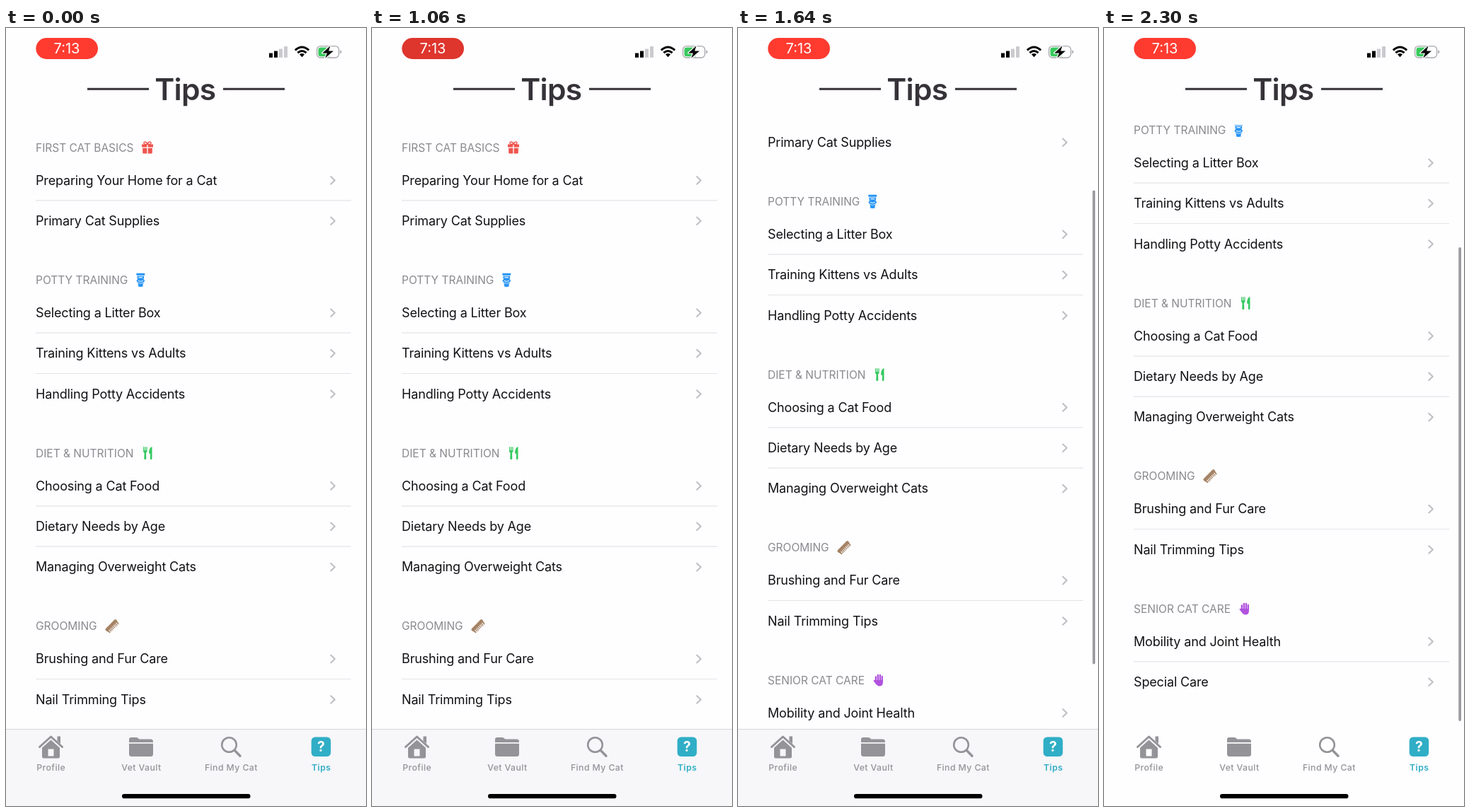
An HTML page that plays this animation: 509 px wide and 1100 px high, repeating every 2.33 s.

```html
<!DOCTYPE html>
<html lang="en">
<head>
<meta charset="utf-8">
<title>Tips</title>
<style>
  html, body { margin: 0; width: 100%; height: 100%; overflow: hidden; background: #fefdff; }
  svg { display: block; width: 100vw; height: 100vh; }
  text { font-family: Inter, "Liberation Sans", sans-serif; }
  .row { font-size: 18px; letter-spacing: -.15px; fill: #111113; }
  .head { font-size: 15.5px; fill: #8a898e; }
  .rule { stroke: #e5e4e7; stroke-width: 1.2; }
  .chevron { fill: none; stroke: #bfbec3; stroke-width: 2; stroke-linecap: round; stroke-linejoin: round; }
  .title { font-size: 42.5px; font-weight: 600; letter-spacing: -.8px; fill: #353238; }
  .clock { font-size: 20px; fill: #fff; }
  .tab { font-size: 12.3px; font-weight: 500; letter-spacing: .4px; fill: #949398; }
  .on { font-weight: 600; fill: #30aec6; }
  .mid { text-anchor: middle; }
</style>
</head>
<body>
<svg viewBox="0 0 509 1100" preserveAspectRatio="none">
  <defs>
    <clipPath id="view"><rect y="137" width="509" height="849"/></clipPath>

    <g id="gift" fill="#f0544d">
      <path d="M-8-4.5H-.7V-.5H-8ZM.7-4.5H8V-.5H.7ZM-6.8 .8H-.7V8.5H-5.5Q-6.8 8.5-6.8 7.2ZM.7 .8H6.8V7.2Q6.8 8.5 5.5 8.5H.7Z"/>
      <path d="M0-4.5C-1-9-5.5-9-5-6Q-4.6-4.5-2.5-4.5ZM0-4.5C1-9 5.5-9 5-6Q4.6-4.5 2.5-4.5Z" fill="none" stroke="#f0544d" stroke-width="1.4"/>
    </g>

    <g id="toilet" fill="#2494f5">
      <rect x="-6" y="-9.5" width="12" height="3" rx="1"/>
      <path d="M-5-5.6H5L4.5-1.5H-4.5Z"/>
      <ellipse cy="1" rx="5.6" ry="3.4"/>
      <path d="M-4.6 4.2Q0 6.4 4.6 4.2L3 6.8 3.6 9Q0 10.6-3.6 9L-3 6.8Z"/>
      <path d="M-3.6 .8Q0 3 3.6 .8M-2.8-3.7H2.8" fill="none" stroke="#fefdff" stroke-width="1.1"/>
    </g>

    <g id="cutlery" fill="#34c960">
      <path d="M-6.5-8.8H-5.3V-3.8H-4.3V-8.8H-3.1V-3.8H-2.1V-8.8H-.9V-3Q-.9-1-2.5-.4L-2.2 7.8Q-2.4 9.2-3.7 9.2T-5.2 7.8L-4.9-.4Q-6.5-1-6.5-3Z"/>
      <path d="M6-9V7.8Q6 9.2 4.7 9.2T3.3 7.8L3.6 1.2 1.6 .3Q1.6-7.6 6-9Z"/>
    </g>

    <g id="comb" transform="rotate(-45)" fill="#a58365">
      <rect x="-10.5" y="-4" width="21" height="4.6" rx="1.6"/>
      <path d="M-10.2-1H-7.6V4.5H-9.2ZM10.2-1H7.6V4.5H9.2Z"/>
      <path d="M-5.9 0V4.5M-3.6 0V4.5M-1.2 0V4.5M1.2 0V4.5M3.6 0V4.5M5.9 0V4.5" stroke="#a58365" stroke-width="1.3"/>
    </g>

    <g id="hand" fill="none" stroke="#b052de" stroke-linecap="round">
      <path d="M-4.4-4.5V2M-1.4-7V1M1.6-7V1M4.5-5V2" stroke-width="2.3"/>
      <path d="M-6.6 .8L-4 4" stroke-width="2.2"/>
      <path d="M-5.4 0H5.6V3.5Q5.4 8.5 .8 8.5-3 8.5-5.4 3.5Z" fill="#b052de" stroke="none"/>
    </g>
  </defs>

  <rect width="509" height="1100" fill="#fefdff"/>
  <g clip-path="url(#view)"><g id="list"></g></g>
  <rect id="thumb" x="501.3" y="141" width="3.7" height="670" rx="1.85" fill="#9b9a9e"/>

  <!-- Status bar -->
  <rect id="pill" x="42.3" y="14" width="87.7" height="30" rx="15"/>
  <text class="clock mid" x="86" y="36.2">7:13</text>
  <g>
    <path d="M372 35.5h5V41.7h-5ZM379 32.5h5V41.7h-5Z" fill="#000"/>
    <path d="M386 29.5h5V41.7h-5ZM393 26h5V41.7h-5Z" fill="#cbcace"/>
  </g>
  <g fill="none" stroke="#000" stroke-width="3">
    <path d="M408.8 31.4Q418.5 22.6 428.2 31.4"/>
    <path d="M412.4 35.2Q418.5 29.8 424.6 35.2"/>
    <path d="M415 37.3Q418.5 34.6 422 37.3L418.5 41.2Z" fill="#000" stroke="none"/>
  </g>
  <rect x="439.6" y="25.6" width="31" height="16.4" rx="5" fill="none" stroke="#a9a8ac" stroke-width="1.3"/>
  <path d="M472.3 31.2Q474.5 32 474.5 33.8T472.3 36.4Z" fill="#a9a8ac"/>
  <path d="M445 27.5H457.5V40.2H445Q441.5 40.2 441.5 36.7V31Q441.5 27.5 445 27.5Z" fill="#38c95d"/>
  <path d="M458.5 25.3L447.3 35.4H454L451.3 42.6 463 32.4H456.2Z" fill="#000" stroke="#fefdff" stroke-width="2.4" paint-order="stroke" stroke-linejoin="round"/>

  <!-- Title -->
  <path d="M115 86.2H202M307 86.2H394" stroke="#353238" stroke-width="3"/>
  <text class="title mid" x="253.3" y="102">Tips</text>

  <!-- Tab bar -->
  <g id="bar">
    <rect y="991" width="509" height="109" fill="#f7f6f9"/>
    <path d="M0 991.5H509" stroke="#d6d5d9" stroke-width="1.2"/>
  </g>
  <g fill="#949398">
    <path d="M47.5 1016.5L63.5 1002 79.5 1016.5" fill="none" stroke="#949398" stroke-width="3" stroke-linecap="round" stroke-linejoin="round"/>
    <path d="M72.5 1001.5H77V1012L72.5 1008Z"/>
    <path d="M51 1017.8L63.5 1006.5 76 1017.8V1030Q76 1032.5 73.5 1032.5H53.5Q51 1032.5 51 1030ZM59.5 1019.5V1029.5H67.5V1019.5Z" fill-rule="evenodd"/>
    <path d="M174 1010V1006Q174 1003 177 1003H183.5Q185.5 1003 187 1004.3L188.4 1005.5H204.5Q208 1005.5 208 1009V1010Z"/>
    <path d="M174 1011.8H208V1026.5Q208 1030 204.5 1030H177.5Q174 1030 174 1026.5Z"/>
    <g fill="none" stroke="#949398" stroke-linecap="round">
      <circle cx="315.5" cy="1013.5" r="10.3" stroke-width="2.6"/>
      <path d="M323.2 1021.3L331 1029.2" stroke-width="3.4"/>
    </g>
  </g>
  <rect x="431.7" y="1002.5" width="27.5" height="27.5" rx="5.5" fill="#30aec6"/>
  <text class="mid" x="445.5" y="1023.2" font-size="19.5" font-weight="700" fill="#fff">?</text>
  <text class="tab mid" x="63.7" y="1050">Profile</text>
  <text class="tab mid" x="191.4" y="1050">Vet Vault</text>
  <text class="tab mid" x="318.4" y="1050">Find My Cat</text>
  <text class="tab on mid" x="445.7" y="1050">Tips</text>
  <rect x="164" y="1083" width="181.5" height="6.3" rx="3.1" fill="#000"/>
</svg>

<script>
  const $ = id => document.getElementById(id);
  const list = $('list'), thumb = $('thumb'), pill = $('pill'), bar = $('bar');

  const sections = [
    ['FIRST CAT BASICS', 'gift', 200, ['Preparing Your Home for a Cat', 'Primary Cat Supplies']],
    ['POTTY TRAINING', 'toilet', 190.3, ['Selecting a Litter Box', 'Training Kittens vs Adults', 'Handling Potty Accidents']],
    ['DIET &amp; NUTRITION', 'cutlery', 200.5, ['Choosing a Cat Food', 'Dietary Needs by Age', 'Managing Overweight Cats']],
    ['GROOMING', 'comb', 150, ['Brushing and Fur Care', 'Nail Trimming Tips']],
    ['SENIOR CAT CARE', 'hand', 199.3, ['Mobility and Joint Health', 'Special Care']]
  ];

  const PITCH = 57.4;

  function buildList() {
    let y = 169, out = '';
    for (const [name, icon, x, rows] of sections) {
      out += `<text class="head" x="42" y="${y + 5.6}">${name}</text>
        <use href="#${icon}" x="${x}" y="${y}"/>`;
      y += 46.4;
      rows.forEach((label, i) => {
        const cy = y + i * PITCH;
        out += `<text class="row" x="42" y="${cy + 6.1}">${label}</text>
          <path class="chevron" d="M459.3 ${cy - 5.3}l5.6 5.3l-5.6 5.3"/>`;
        if (i) out += `<path class="rule" d="M42 ${cy - 29}H488"/>`;
      });
      y += (rows.length - 1) * PITCH + 83.5;
    }
    list.innerHTML = out;
  }

  const LOOP = 2330;
  // time, scroll offset
  const drag = [[1150, 0], [1240, 12.5], [1640, 111], [1850, 142.5], [2090, 187], [2300, 212]];
  const clamp = v => Math.min(1, Math.max(0, v));
  const slope = i => (drag[i + 1][1] - drag[i][1]) / (drag[i + 1][0] - drag[i][0]);
  const speed = drag.map((_, i) =>
    i === 0 ? 0 : i === drag.length - 1 ? .09 : (slope(i - 1) + slope(i)) / 2);

  // Smooth curve through the drag points
  function scrollAt(t) {
    if (t <= drag[0][0]) return 0;
    let i = 0;
    while (i < drag.length - 2 && t > drag[i + 1][0]) i++;
    const [t0, a] = drag[i], [t1, b] = drag[i + 1], d = t1 - t0;
    const u = clamp((t - t0) / d), v = 1 - u;
    return a * v * v * (1 + 2 * u) + b * u * u * (3 - 2 * u)
      + d * u * v * (v * speed[i] - u * speed[i + 1]);
  }

  // The screen refreshes every 30 ms
  const tick = t => t < 1640
    ? Math.min(1600, Math.floor((t - 10) / 30) * 30 + 10)
    : Math.floor((t - 20) / 30) * 30 + 20;

  function render(ms) {
    const t = Math.max(0, tick(ms % LOOP));
    const y = scrollAt(t);
    list.setAttribute('transform', `translate(0 ${-y.toFixed(2)})`);
    thumb.setAttribute('y', 141 + y * .797);
    thumb.setAttribute('opacity', clamp((t - 1140) / 60));
    bar.setAttribute('opacity', 1 - clamp((y - 190) / 11));
    const dim = t < 1700 ? (1 - Math.cos(t / 1700 * 2 * Math.PI)) / 2 : 0;
    pill.setAttribute('fill', `rgb(${255 - 38 * dim}, ${59 - 7 * dim}, ${48 - 4 * dim})`);
  }

  buildList();
  const start = performance.now();
  function loop() {
    render(performance.now() - start);
    requestAnimationFrame(loop);
  }
  loop();
</script>
</body>
</html>
```
